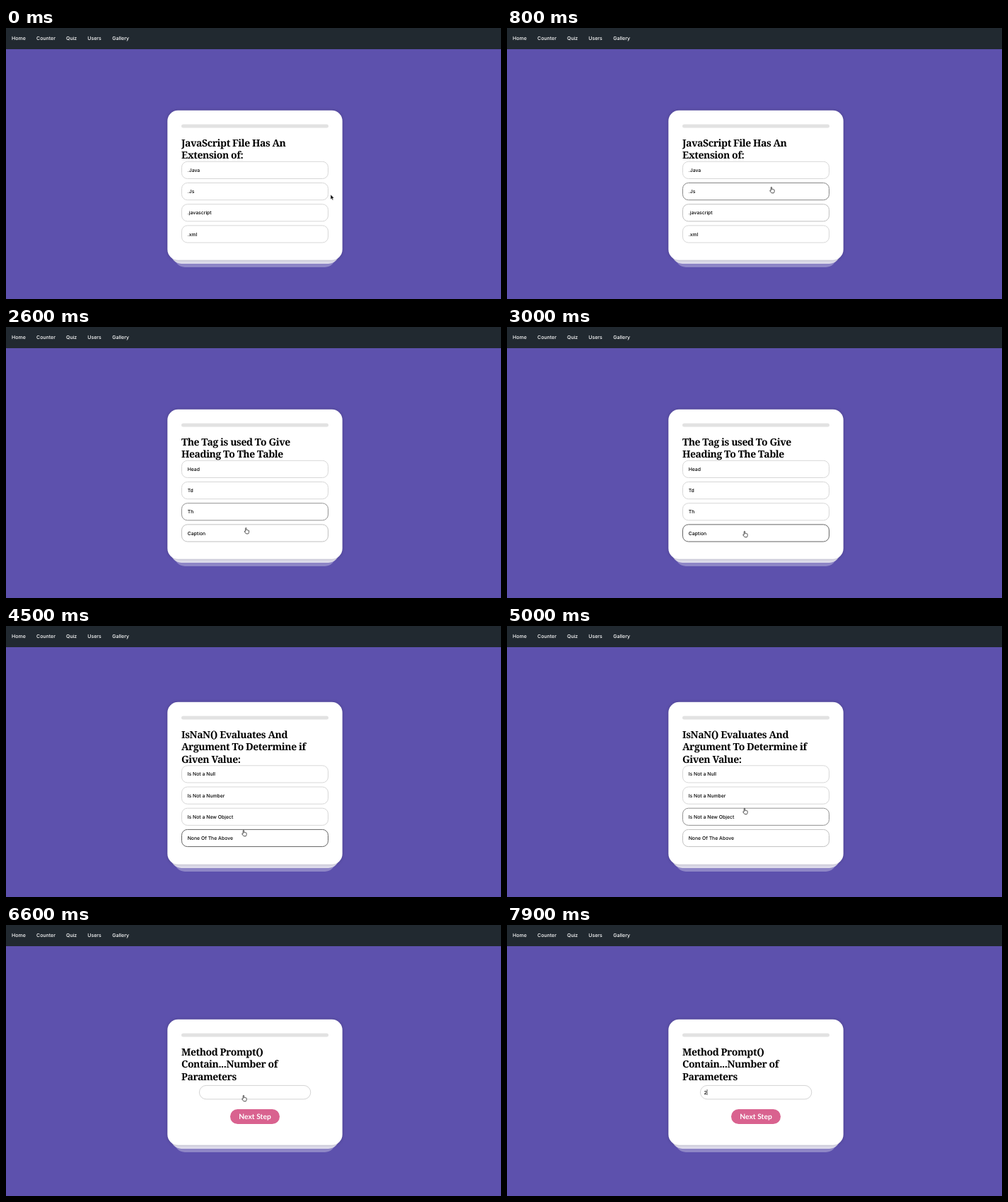
An HTML page that plays this animation: 700x384 px, repeating every 8 s.

```html
<!DOCTYPE html>
<html lang="en">
<head>
<meta charset="utf-8">
<title>Quiz</title>
<style>
  html, body { margin: 0; width: 100%; height: 100%; overflow: hidden; background: #5d51ad; }
  svg { display: block; width: 700px; height: 384px; text-rendering: geometricPrecision; }
  text { font: 500 6.85px Inter, sans-serif; white-space: pre; }
  .title { font: 700 14px Merriweather, "Noto Serif", serif; letter-spacing: -0.45px; }
  .button { font: 700 10.3px Nunito, Lato, sans-serif; fill: #fff; text-anchor: middle; }
  .nav { fill: #fff; font-size: 7px; }
</style>
</head>
<body>
<svg id="stage" viewBox="0 0 700 384"></svg>
<script>
const LOOP = 8000, STEP = 100, FADE = 300;
const stage = document.getElementById('stage');

const menu = [['Home', 8], ['Counter', 43], ['Quiz', 85], ['Users', 115.3], ['Gallery', 150.3]];

const questions = [
  { from: 0, top: 117, height: 212, title: ['JavaScript File Has An', 'Extension of:'],
    options: ['.Java', '.Js', '.javascript', '.xml'] },
  { from: 1400, top: 117, height: 212, title: ['The Tag is used To Give', 'Heading To The Table'],
    options: ['Head', 'Td', 'Th', 'Caption'] },
  { from: 4500, top: 108, height: 230,
    title: ['IsNaN() Evaluates And', 'Argument To Determine if', 'Given Value:'],
    options: ['Is Not a Null', 'Is Not a Number', 'Is Not a New Object', 'None Of The Above'] },
  { from: 6600, top: 134, height: 178,
    title: ['Method Prompt()', 'Contain...Number of', 'Parameters'] }
];

// Pointer stops: time, x, y
const route = [
  [0, 459, 236], [300, 446, 325], [700, 371, 225], [2000, 371, 225], [2300, 355, 258],
  [2700, 333, 289], [4700, 333, 289], [5200, 333, 241], [8000, 333, 241]
];

function pointerAt(t) {
  const i = route.findIndex(stop => stop[0] > t);
  if (i < 1) return route[0].slice(1);
  const [t0, x0, y0] = route[i - 1], [t1, x1, y1] = route[i];
  const u = (t - t0) / (t1 - t0), k = u * u * (3 - 2 * u);
  return [x0 + (x1 - x0) * k, y0 + (y1 - y0) * k];
}

const rect = (x, y, w, h, r, fill, extra = '') =>
  `<rect x="${x}" y="${y}" width="${w}" height="${h}" rx="${r}" fill="${fill}" ${extra}/>`;
const text = (x, y, s, cls = '') => `<text x="${x}" y="${y}" class="${cls}">${s}</text>`;
const path = (d, fill, stroke, width) =>
  `<path d="${d}" fill="${fill}" stroke="${stroke}" stroke-width="${width}" stroke-linejoin="round"/>`;

const optionY = (q, i) => q.top + 36.9 + 17.5 * q.title.length + 30.2 * i;

function hovered(q, t) {
  const [x, y] = pointerAt(t);
  if (!q.options || x + 3 > 456) return -1;
  return q.options.findIndex((_, i) => y + 1 > optionY(q, i) && y + 1 < optionY(q, i) + 25);
}

// Share of the last FADE ms spent over an option
function glow(q, i, t) {
  let n = 0;
  for (let k = 0; k < 10; k++) n += hovered(q, t - k * FADE / 10) === i;
  return n / 10;
}

const cursors = {
  arrow: path('M0 0v7l1.6-1.4 1 2.4 1.3-.5-1-2.4h2.2z', '#111', '#fff', 0.5),
  hand: path('M2.2 5.3V1.2q0-.8.7-.8t.7.8v2.4q.6-.4 1.2.1.7-.3 1.1.2.8-.2 1.2.5v2q0 1.4-.9 2.4H3.2' +
    'L.8 5.9q-.2-.9.6-.8z', '#fff', '#222', 0.8),
  beam: path('M2.5.8q1.5 0 1.5 1v6q0 1-1.5 1M5.5.8q-1.5 0-1.5 1v6q0 1 1.5 1', 'none', '#444', 0.7)
};

function card({ top, height, title }) {
  return rect(238, top + 10, 228, height, 15, '#8e86c6') +
    rect(233, top + 5, 238, height, 15, '#dfddec') +
    rect(228.3, top - 0.2, 247.4, height, 15, '#fff', 'style="filter:drop-shadow(0 0 2px #0003)"') +
    rect(248, top + 19.5, 208, 5, 2.5, '#e2e2e2') +
    title.map((line, i) => text(248, top + 50.7 + 17.5 * i, line, 'title')).join('');
}

function options(q, t) {
  return q.options.map((label, i) => {
    const y = optionY(q, i), c = Math.round(215 - 115 * glow(q, i, t));
    return rect(248.5, y + 0.4, 207, 24.2, 8, '#fff', `stroke="rgb(${c},${c},${c})"`) +
      text(256.7, y + 15, label);
  }).join('');
}

function form(t) {
  const typed = t >= 7900;
  let out = rect(273.4, 227.4, 157.4, 19.4, 9.7, '#fff', 'stroke="#d4d4d4"') +
    rect(317, 261, 70, 21, 10.5, '#d9628f') + text(352, 275.1, 'Next Step', 'button');
  if (typed) out += text(278.6, 239.7, '2');
  if (t >= 7500) out += rect(typed ? 282.6 : 278.6, 233, 0.8, 8, 0, '#333');
  return out;
}

function pointer(q, t) {
  if (t >= 7900) return '';
  const [x, y] = pointerAt(t);
  const kind = t >= 7000 ? 'beam' : !q.options || hovered(q, t) >= 0 ? 'hand' : 'arrow';
  return `<g transform="translate(${x} ${y})">${cursors[kind]}</g>`;
}

function draw(now) {
  const t = Math.floor(now % LOOP / STEP) * STEP;
  const q = questions.findLast(item => item.from <= t);
  stage.innerHTML = rect(0, 0, 700, 384, 0, '#5d51ad') + rect(0, 0, 700, 30, 0, '#212930') +
    menu.map(([label, x]) => text(x, 17, label, 'nav')).join('') +
    card(q) + (q.options ? options(q, t) : form(t)) + pointer(q, t);
}

const start = performance.now();
function tick() {
  draw(performance.now() - start);
  requestAnimationFrame(tick);
}
tick();
</script>
</body>
</html>
```
